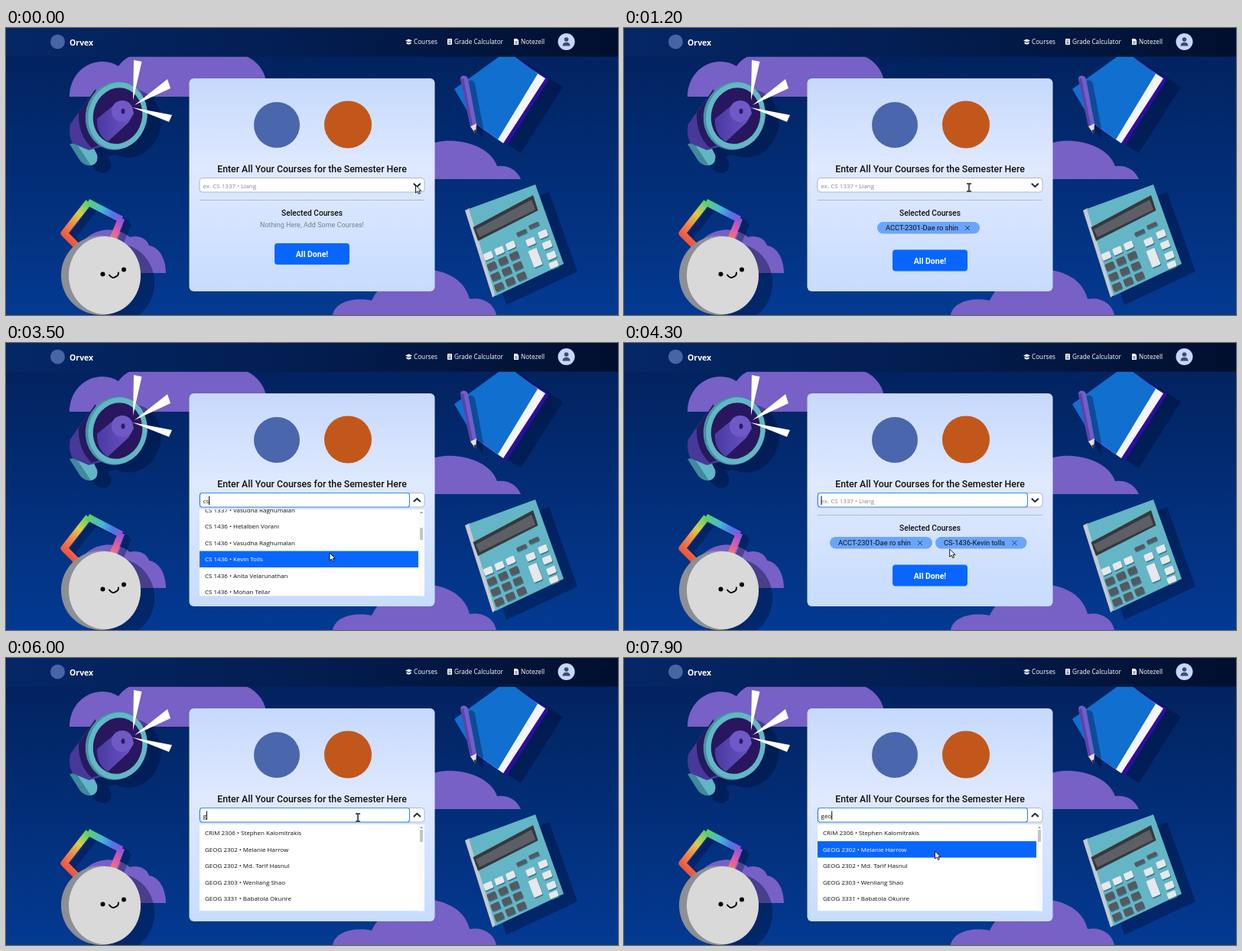
An HTML page for the animation above (8000 ms loop, 800 by 376 pixels).

```html
<!DOCTYPE html>
<html lang="en">
<head>
<meta charset="utf-8">
<title>Course picker</title>
<style>
html, body { margin: 0; width: 100%; height: 100%; overflow: hidden; background: #03235f; }
svg { display: block; width: 100vw; height: 100vh; }
text { font: 8px "Open Sans", "Noto Sans", sans-serif; fill: #111; white-space: pre; }
.head { font-family: Roboto, Inter, sans-serif; font-weight: 500; text-anchor: middle; }
.nav { font-size: 8.2px; font-weight: 500; fill: #fff; }
.chip text { font: 9.3px Roboto, Inter, sans-serif; }
.chip path { stroke: #26406f; stroke-width: 1; }
.cloud { fill: #7760c6; }
.shade { filter: drop-shadow(18px 10px 0 rgba(0, 12, 52, .4)); }
.tight { filter: drop-shadow(9px 6px 0 rgba(0, 12, 52, .35)); }
</style>
</head>
<body>
<svg viewBox="0 0 800 376" preserveAspectRatio="none">
  <defs>
    <linearGradient id="sky" x2="0" y2="1"><stop stop-color="#02205a"/><stop offset="1" stop-color="#033a92"/></linearGradient>
    <linearGradient id="bar"><stop stop-color="#042766"/><stop offset=".5" stop-color="#031d50"/><stop offset="1" stop-color="#010f2e"/></linearGradient>
    <linearGradient id="panel" x2="0" y2="1"><stop stop-color="#c6d9fc"/><stop offset=".42" stop-color="#dfe9ff"/><stop offset="1" stop-color="#c7dcfe"/></linearGradient>
    <linearGradient id="cone"><stop stop-color="#4a3aa2"/><stop offset="1" stop-color="#6b55c4"/></linearGradient>
    <linearGradient id="warm" gradientUnits="userSpaceOnUse" x1="74" y1="272" x2="108" y2="229">
      <stop stop-color="#ee5540"/><stop offset=".35" stop-color="#f08a4a"/><stop offset=".65" stop-color="#d9cc4a"/><stop offset="1" stop-color="#5fcf6a"/>
    </linearGradient>
    <linearGradient id="cool" gradientUnits="userSpaceOnUse" x1="108" y1="229" x2="152" y2="251">
      <stop stop-color="#5fcf6a"/><stop offset=".4" stop-color="#45b9d6"/><stop offset=".7" stop-color="#4a78e6"/><stop offset="1" stop-color="#8a55d8"/>
    </linearGradient>
    <linearGradient id="tail" gradientUnits="userSpaceOnUse" x1="152" y1="250" x2="138" y2="281">
      <stop stop-color="#8a55d8"/><stop offset=".5" stop-color="#e25aa8"/><stop offset="1" stop-color="#f08a4a"/>
    </linearGradient>
    <clipPath id="below"><rect y="37.500" width="800" height="339"/></clipPath>
    <clipPath id="menuBox"><rect x="253" y="218" width="294" height="113.500"/></clipPath>
  </defs>

  <rect width="800" height="376" fill="url(#sky)"/>

  <g clip-path="url(#below)">
    <g class="cloud">
      <path d="M83 90C83 64 102 44 126 44C134 44 141 46 147 50C154 40 166 32 186 32H300C324 38 339 52 341 76V90Z"/>
      <path d="M545 198V156C560 149 572 147 586 148C614 150 636 163 642 181C657 179 668 186 673 198Z"/>
      <path d="M90 321V300A45 45 0 0 1 162 274C170 271 184 274 187 285C200 287 209 302 209 321Z"/>
      <path d="M427 376C430 360 452 352 478 357C490 331 520 314 548 316C578 318 600 331 606 355C622 352 638 360 641 376Z"/>
    </g>

    <!-- megaphone -->
    <g class="shade">
      <path d="M83 152L104 148L119 166Q121 178 111 180Q103 181 97 174Z" fill="#3e8b9d"/>
      <path d="M93 153L110 148L119 166Q121 178 111 180Z" fill="#62b5c6"/>
      <path d="M84 126L108 92L132 154L108 160L87 151Q81 140 84 126Z" fill="#47389a"/>
      <path d="M95 111L117 80L131 150L112 157Q94 140 95 111Z" fill="#241b5e"/>
      <ellipse cx="144" cy="115" rx="40" ry="45" transform="rotate(14 144 115)" fill="#4394a5"/>
      <ellipse cx="146" cy="115" rx="38.500" ry="44" transform="rotate(14 146 115)" fill="#63b7c5"/>
      <ellipse cx="146" cy="115" rx="32" ry="37" transform="rotate(14 146 115)" fill="#28175e"/>
    </g>
    <path d="M119 119L146 97Q164 94 167 112L160 124L133 149Q118 139 119 119Z" fill="url(#cone)"/>
    <ellipse cx="152" cy="109" rx="14" ry="14" fill="#7059c6"/>
    <ellipse cx="153" cy="109" rx="2.500" ry="3.500" fill="#2a1b68"/>
    <path d="M167 42L177.500 44L166 95ZM211 67L215 79L168 101ZM165 104L217 114L213 123Z" fill="#fff"/>

    <!-- book and pencil -->
    <g class="shade">
      <path d="M652 30L710 67L655 154L612 126Z" fill="#2c0e9c"/>
      <path d="M652 32L705 66L650 151L612 124Z" fill="#f3f5fb"/>
      <path d="M586 80L655 30L695 60L643 146L612 124Z" fill="#116fd0"/>
    </g>
    <g class="tight">
      <path d="M594 67Q594 62 599 62.500Q603 63 604 67L615 125L607 129Z" fill="#735dca"/>
      <path d="M594 67L598 66L610 127L607 129Z" fill="#5845a8"/>
      <path d="M607 129L615 125L614 139Z" fill="#eadfd2"/>
      <path d="M611.500 134L614.500 133L614 140Z" fill="#2c2450"/>
    </g>

    <!-- medal -->
    <g fill="none" stroke-width="9" stroke-linejoin="round" class="tight">
      <path d="M92 285L76 269L108 228" stroke="url(#warm)"/>
      <path d="M107 228L151 251" stroke="url(#cool)"/>
      <path d="M151 249L137 283" stroke="url(#tail)"/>
    </g>
    <g class="shade">
      <circle cx="124" cy="324" r="52" fill="#8d8f94"/>
      <ellipse cx="129" cy="324" rx="47" ry="51" fill="#d9d9da"/>
    </g>
    <circle cx="126.500" cy="322.500" r="3"/><circle cx="154" cy="316.500" r="3"/>
    <path d="M135 323.500Q139 329 143 326Q147 325 147 320.500" fill="none" stroke="#000" stroke-width="2" stroke-linecap="round"/>

    <!-- calculator -->
    <g class="shade">
      <path d="M600 239L606 236L643 348L636 353Z" fill="#c3cbd0"/>
      <path d="M605 237L692 205L729 309L640 351Z" fill="#64b5c6"/>
    </g>
    <path d="M610.500 261L689 219L695.500 239L617 279Z" fill="#36383c"/>
    <path d="M614 264L687 225L692 238L619 274Z" fill="#5c5f65"/>
    <g id="keys"></g>
  </g>

  <!-- navigation -->
  <rect width="800" height="37.500" fill="url(#bar)"/>
  <circle cx="67.500" cy="18" r="9.500" fill="#4764a6"/>
  <text x="83" y="22.500" style="font-size:10.500px;font-weight:700;fill:#fff">Orvex</text>
  <g fill="#fff">
    <path d="M522 16.500L526.500 14.500L531 16.500L526.500 18.500ZM523.500 18.300L526.500 19.600L529.500 18.300V20.500Q526.500 22.500 523.500 20.500Z"/>
    <rect x="577" y="14" width="6" height="8" rx="1"/>
    <path d="M664 14H668L670 16V22H664Z"/>
  </g>
  <path d="M578.300 16H581.700M578.300 18.500H581.700M578.300 20.300H581.700M665.300 18H668.700M665.300 20H668.700" stroke="#031b48" stroke-width=".8"/>
  <text class="nav" x="533" y="21">Courses</text>
  <text class="nav" x="586" y="21">Grade Calculator</text>
  <text class="nav" x="673" y="21">Notezell</text>
  <circle cx="732.500" cy="18" r="11" fill="#c5d8fb"/>
  <circle cx="732.500" cy="15" r="2.800" fill="#3f4d6c"/>
  <path d="M727.500 23.500Q727.500 18.800 732.500 18.800Q737.500 18.800 737.500 23.500Z" fill="#3f4d6c"/>

  <!-- card -->
  <rect x="239.500" y="66" width="321" height="279" rx="6" fill="url(#panel)"/>
  <circle cx="354" cy="127" r="30" fill="#4a66ad"/>
  <circle cx="447" cy="126.500" r="31" fill="#c2571c"/>
  <text class="head" x="400" y="188.500" style="font-size:12.300px">Enter All Your Courses for the Semester Here</text>
  <path d="M253 225.500H547" stroke="#b3bccd"/>
  <text class="head" x="400" y="246" style="font-size:10.200px">Selected Courses</text>
  <text class="head" id="empty" x="400" y="260.500" style="font-size:9px;font-weight:400;fill:#777f8e">Nothing Here, Add Some Courses!</text>
  <g class="chip" id="chipA">
    <rect width="134" height="15.500" rx="7.750" fill="#6ba5fa"/>
    <text x="11" y="11">ACCT-2301-Dae ro shin</text>
    <path d="M115 5L121 11M121 5L115 11"/>
  </g>
  <g class="chip" id="chipB" transform="translate(407 254)">
    <rect width="119.500" height="15.500" rx="7.750" fill="#6ba5fa"/>
    <text x="11" y="11">CS-1436-Kevin tolls</text>
    <path d="M100.500 5L106.500 11M106.500 5L100.500 11"/>
  </g>
  <g id="done">
    <rect x="351" width="98" height="28" rx="4" fill="#0866ff"/>
    <text class="head" x="400" y="18" style="font-size:10.500px;font-weight:700;fill:#fff">All Done!</text>
  </g>

  <!-- field -->
  <rect x="253" y="196.500" width="294" height="18.500" rx="4" fill="#fff" stroke="#b4b8c0"/>
  <rect id="focus" x="253.500" y="196.500" width="274" height="18.500" rx="3" fill="#fff" stroke="#3d8be6" stroke-width="1.200"/>
  <text id="hint" x="257.500" y="209.500" style="fill:#858991">ex. CS 1337 • Liang</text>
  <text id="typed" x="257.500" y="209.500"></text>
  <path id="caret" d="M0 200.500V212" stroke="#000"/>
  <path id="chevron" fill="none" stroke="#1d2740" stroke-width="2"/>

  <!-- menu -->
  <g id="menu" clip-path="url(#menuBox)">
    <rect x="253" y="218" width="294" height="113.500" fill="#fff"/>
    <rect id="mark" x="253" width="286" height="21.500" fill="#0866ff"/>
    <g id="rows"></g>
    <rect x="539" y="218" width="8" height="113.500" fill="#fbfbfc"/>
    <path d="M541.200 223L543 220.800L544.800 223Z" fill="#888"/>
    <rect id="thumb" x="541" width="4" height="16" rx="1" fill="#c4c5c8"/>
  </g>

  <path id="arrow" d="M0 0V10L2.400 7.900L4 11.400L5.700 10.600L4.200 7.300H7.300Z" fill="#fff" stroke="#000" stroke-width=".9"/>
  <g id="beam" fill="none">
    <path d="M-3 -5H3M0 -5V5M-3 5H3" stroke="#fff" stroke-width="2.600"/>
    <path d="M-3 -5H3M0 -5V5M-3 5H3" stroke="#222" stroke-width="1.500"/>
  </g>
</svg>
<script>
const $ = id => document.getElementById(id);
const LOOP = 8000, STEP = 100, ROW = 21.5, TOP = 218.5, BLINK = 530;
const PICK_A = 800, PICK_B = 4200, SCROLL = 118;

const courses = {
  acct: ["ACCT 2301 • Dae Ro Shin", "ACCT 2301 • Laura Pennick", "ACCT 2302 • Oscar Brindle",
    "ACCT 3312 • Helen Marsk", "ACCT 3331 • Peter Landow", "ACCT 3341 • Joan Tilbeck"],
  cs: ["CS 1200 • Brent Wells", "CS 1200 • Warren Haddle", "CS 1200 • Paul Dray",
    "CS 1325 • Kavya Mellanti", "CS 1337 • Warren Haddle", "CS 1337 • Vasudha Raghumalan",
    "CS 1436 • Hetalben Vorani", "CS 1436 • Vasudha Raghumalan", "CS 1436 • Kevin Tolls",
    "CS 1436 • Anita Velarunathan", "CS 1436 • Mohan Tellar"],
  geo: ["CRIM 2306 • Stephen Kalomitrakis", "GEOG 2302 • Melanie Harrow", "GEOG 2302 • Md. Tarif Hasnul",
    "GEOG 2303 • Wenliang Shao", "GEOG 3331 • Babatola Okunre", "GEOG 3357 • Irene Maddox"]
};

// time, x, y
const pointer = [[0, 535.5, 206], [200, 535.5, 206], [500, 424, 229], [800, 424, 229], [1100, 451, 209],
  [3000, 451, 209], [3300, 423, 275], [4200, 423, 275], [4800, 460, 209], [6900, 460, 209],
  [7600, 406.5, 253], [LOOP, 406.5, 253]];

// moments when the field gains focus or its text changes
const edits = [[1500, ""], [2000, "c"], [2060, "cs"], [PICK_B, ""], [6000, "g"], [6200, "ge"], [6360, "geo"]];

const ease = (t, a, b) => {
  const p = Math.min(1, Math.max(0, (t - a) / (b - a)));
  return p * p * (3 - 2 * p);
};
const show = (id, on) => $(id).setAttribute("display", on ? "inline" : "none");
const place = (id, x, y) => $(id).setAttribute("transform", `translate(${x} ${y})`);

function svg(tag, parent, attrs) {
  const el = document.createElementNS("http://www.w3.org/2000/svg", tag);
  for (const key in attrs) el.setAttribute(key, attrs[key]);
  return parent.appendChild(el);
}

function drawKeys() {
  const key = (x, y, w, h, fill) => {
    const box = { x: -w / 2, y: -h / 2, width: w, height: h, rx: 1.5 };
    const turn = "rotate(-24) skewX(-3)";
    svg("rect", $("keys"), { ...box, fill: "#35798a", transform: `translate(${x + 1} ${y + 1.5}) ${turn}` });
    svg("rect", $("keys"), { ...box, fill, transform: `translate(${x} ${y}) ${turn}` });
  };
  const dark = "#55585f", light = "#e6e8ec";
  for (let r = 0; r < 4; r++)
    for (let c = 0; c < 3; c++)
      key(630.5 + 14.6 * c + 4.7 * r, 298.5 - 6.8 * c + 13.4 * r, 12, 9, r ? dark : light);
  key(674, 268, 14, 5, dark);
  key(690, 258.5, 14, 5, dark);
  for (let r = 0; r < 3; r++) key(702 + 5.5 * r, 270 + 14 * r, 12, 9, light);
  key(686, 280, 12, 9, light);
  key(692, 301, 12, 23, light);
  key(716, 310, 12, 8, light);
}

const rows = courses.cs.map(() => svg("text", $("rows"), { x: 260 }));

function pointerAt(t) {
  const i = pointer.findIndex(p => p[0] > t);
  const [t0, x0, y0] = pointer[i - 1], [t1, x1, y1] = pointer[i], k = ease(t, t0, t1);
  return [x0 + (x1 - x0) * k, y0 + (y1 - y0) * k];
}

function drawMenu(list, scroll, x, y) {
  const over = y > TOP && x < 539 ? Math.floor((y - TOP + scroll) / ROW) : -1;
  rows.forEach((row, i) => {
    row.textContent = list[i] || "";
    row.setAttribute("y", TOP + ROW * i - scroll + 13.6);
    row.style.fill = i === over ? "#fff" : "#111";
  });
  show("mark", over >= 0);
  $("mark").setAttribute("y", TOP + ROW * over - scroll);
  $("thumb").setAttribute("y", 225 + scroll * 17 / SCROLL);
}

function draw(t) {
  const [x, y] = pointerAt(t);
  const edit = edits.filter(e => e[0] <= t).pop();
  const word = edit ? edit[1] : "";
  const open = (t >= 200 && t < PICK_A) || word !== "";
  const focused = open || !!edit;

  const inField = x > 253 && x < 528 && y > 196 && y < 216;
  show("beam", inField);
  show("arrow", !inField);
  place("beam", x, y);
  place("arrow", x, y);

  show("focus", focused);
  show("hint", !word);
  $("typed").textContent = word;
  const since = t - (edit ? edit[0] : 200);
  show("caret", focused && Math.floor(since / BLINK) % 2 === 0);
  place("caret", 258 + (word ? $("typed").getComputedTextLength() : 0), 0);
  $("chevron").setAttribute("d", open ? "M532.800 208L537.300 203.800L541.800 208" : "M532.800 203.800L537.300 208L541.800 203.800");

  show("empty", t < PICK_A);
  show("chipA", t >= PICK_A);
  show("chipB", t >= PICK_B);
  place("chipA", t < PICK_B ? 331 : 269, 254);
  place("done", 0, t < PICK_A ? 282 : 290.5);

  show("menu", open);
  const list = word[0] === "g" ? courses.geo : word === "cs" ? courses.cs : courses.acct;
  if (open) drawMenu(list, word === "cs" ? SCROLL * ease(t, 3100, 3500) : 0, x, y);
}

// the screen advances in steps and rests before and after the second search
function stepTime(t) {
  const s = Math.floor(t / STEP) * STEP;
  if (s >= 1600 && s < 2000) return 1600;
  if (s >= 2600 && s < 3000) return 2600;
  return s;
}

function frame() {
  draw(stepTime(performance.now() % LOOP));
  requestAnimationFrame(frame);
}

drawKeys();
frame();
</script>
</body>
</html>
```
